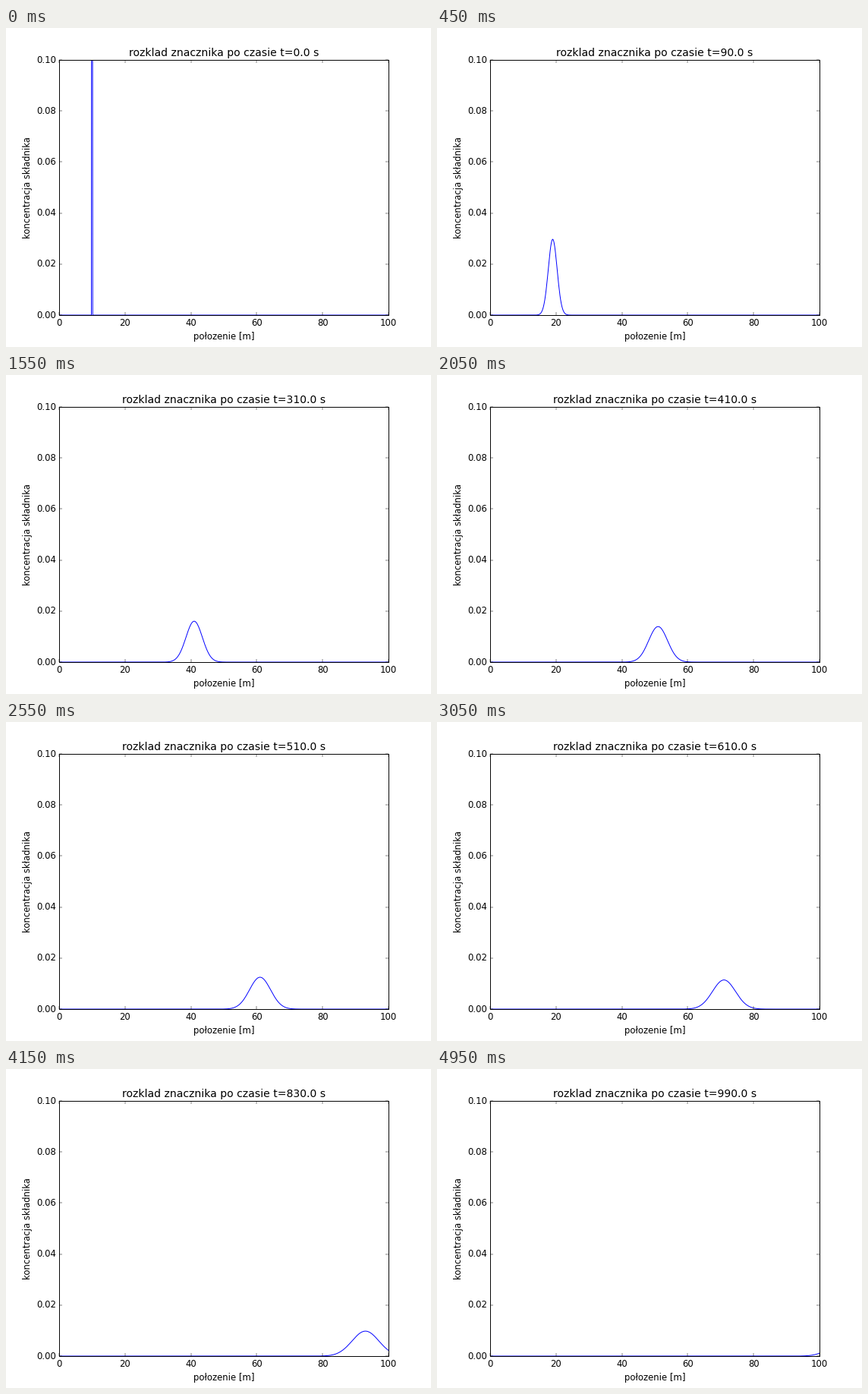
A matplotlib script that plays this animation: 560 by 420 pixels, repeating every 5000 ms.

```python
import numpy as np
import matplotlib.pyplot as plt
from matplotlib.animation import FuncAnimation

plt.style.use("classic")
plt.rcParams["font.family"] = "DejaVu Sans"

FRAMES, INTERVAL = 100, 50
TIME_STEP = 10.0      # simulated seconds per frame
START, SPEED = 10.0, 0.1
DIFFUSION, MASS = 0.01, 0.1
DX = 0.2
x = np.linspace(0, 100, int(100 / DX) + 1)


def concentration(t):
    """Tracer pulse carried along and spread by diffusion."""
    if t == 0:
        return np.where(np.isclose(x, START), MASS / DX, 0.0)
    spread = 4 * DIFFUSION * t
    return MASS / np.sqrt(np.pi * spread) * np.exp(-(x - START - SPEED * t) ** 2 / spread)


fig = plt.figure(figsize=(8, 6), dpi=70, facecolor="white")
ax = fig.add_axes([0.125, 0.1, 0.775, 0.8])
line, = ax.plot(x, concentration(0), "b-", lw=1)
ax.set_xlim(0, 100)
ax.set_ylim(0, 0.1)
ax.set_xticks(np.arange(0, 101, 20))
ax.set_yticks(np.linspace(0, 0.1, 6))
ax.set_xlabel("połozenie [m]")
ax.set_ylabel("koncentracja składnika")
title = ax.set_title("")


def update(i):
    t = i * TIME_STEP
    line.set_ydata(concentration(t))
    title.set_text(f"rozklad znacznika po czasie t={t:.1f} s")
    return line, title


anim = FuncAnimation(fig, update, frames=FRAMES, interval=INTERVAL,
                     repeat=True, repeat_delay=0)
plt.show()
```
